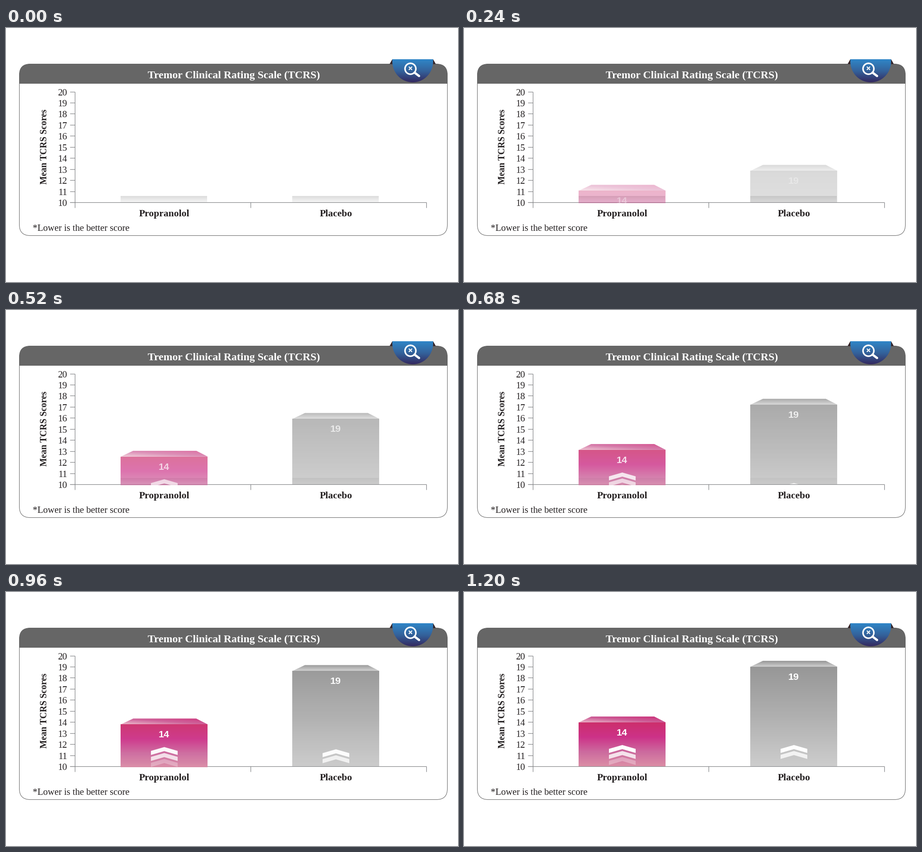
Recreate the animation shown at these times as a matplotlib script. Size 998x561 px, loop 8000 ms.

```python
import numpy as np
import matplotlib.pyplot as plt
from matplotlib.animation import FuncAnimation
from matplotlib.colors import to_rgb
from matplotlib.patches import FancyBboxPatch, Polygon, Rectangle, Circle
from matplotlib.path import Path
from matplotlib.transforms import Affine2D, Bbox, TransformedBbox

W, H = 998, 561
DPI = 100
STEP = 40           # ms per frame
LOOP = 8000
RISE = 1200         # ms the bars need to rise and fade in
PX = 72 / DPI       # points per pixel

INK = "#231f20"
AXIS = "#808285"
LEFT, RIGHT, TOP, BASE = 152, 928, 140.6, 385
BAR_W = 192

plt.rcParams["toolbar"] = "None"
fig = plt.figure(figsize=(W / DPI, H / DPI), dpi=DPI, facecolor="white")
ax = fig.add_axes([0, 0, 1, 1])
ax.set_xlim(0, W)
ax.set_ylim(H, 0)
ax.axis("off")


def ramp(k, colors):
    """Colours at positions k (0 to 1) along evenly spaced key colours."""
    keys = np.array([to_rgb(c) for c in colors])
    pos = np.linspace(0, 1, len(keys))
    return np.stack([np.interp(k, pos, keys[:, i]) for i in range(3)], axis=-1)


def vertical(*colors):
    return ramp(np.linspace(0, 1, 220), colors)[:, None, :]


def label(x, y, text, px, weight="normal", color=INK, family="Liberation Serif", **kw):
    kw.setdefault("ha", "center")
    return ax.text(x, y, text, fontsize=px * PX, fontweight=weight, color=color,
                   family=family, va="baseline", **kw)


def line(xs, ys, width=1.2, color=AXIS, z=1.0, cap="butt"):
    ax.plot(xs, ys, color=color, lw=width * PX, zorder=z, solid_capstyle=cap)


def gradient_shape(verts, pixels, z, trans=ax.transData):
    """Fill a polygon with an image that spans its bounding box."""
    verts = np.asarray(verts, float)
    (x0, y0), (x1, y1) = verts.min(axis=0), verts.max(axis=0)
    img = ax.imshow(pixels, extent=(x0, x1, y1, y0), aspect="auto",
                    interpolation="nearest", zorder=z, transform=trans)
    img.set_clip_path(Path(np.vstack([verts, verts[:1]])), trans)
    return img


def box(x0, y0, x1, y1):
    return [(x0, y0), (x1, y0), (x1, y1), (x0, y1)]


def draw_panel():
    def frame(**kw):
        return ax.add_patch(FancyBboxPatch(
            (29.5, 79.5), 945, 379, boxstyle="round,pad=0,rounding_size=24", **kw))

    panel = frame(fc="white", ec="none", zorder=0)
    header = ax.add_patch(Rectangle((29, 79), 947, 44, fc="#666666", ec="none", zorder=0.2))
    header.set_clip_path(panel)
    frame(fc="none", ec="#5f5f5f", lw=PX, zorder=0.3)
    label(503, 110.5, "Tremor Clinical Rating Scale (TCRS)", 23.7, "bold", "white")
    label(59, 447.5, "*Lower is the better score", 20.6, ha="left")


def draw_badge():
    mid, top, r = 898, 69, 45
    for side in (-1, 1):
        ax.add_patch(Polygon([(mid + side * r, top), (mid + side * (r + 6), top + 10.5),
                              (mid + side * (r - 1), top + 11)],
                             fc="#35262b", ec="none", zorder=0.5))
    a = np.linspace(0, np.pi, 60)
    bowl = np.column_stack([mid + r * np.cos(a), top + 5 + (r + 1) * np.sin(a)])
    verts = np.vstack([[(mid + r, top)], bowl, [(mid - r, top)]])
    gradient_shape(verts, vertical("#2f86c8", "#34639c", "#33285f"), 0.6)

    cx, cy = 893, 90
    ax.add_patch(Circle((cx, cy), 12, fc="none", ec="white", lw=3.4 * PX, zorder=0.7))
    line([cx + 9, cx + 19], [cy + 8.5, cy + 16], 5, "white", 0.7, "round")
    for d in (-3.5, 3.5):
        line([cx - 3.5, cx + 3.5], [cy - 1 - d, cy - 1 + d], 2.2, "white", 0.7)


def draw_axes():
    line([LEFT, LEFT], [TOP, BASE])
    line([LEFT - 11, RIGHT], [BASE, BASE])
    for x in np.linspace(LEFT, RIGHT, 3):
        line([x, x], [BASE, BASE + 12])
    for score, y in zip(range(10, 21), np.linspace(BASE, TOP, 11)):
        line([LEFT - 11, LEFT], [y, y])
        label(134.7, y + 8, str(score), 20.8, ha="right")
    label(90.5, 262.5, "Mean TCRS Scores", 19.9, "bold", rotation=90,
          rotation_mode="anchor")


class Bar:
    """A block that slides up from behind its floor while its parts fade in."""

    def __init__(self, name, value, x, top, travel, floor, front, face, chevrons):
        self.travel = travel
        self.move = Affine2D()
        trans = self.move + ax.transData
        clip = TransformedBbox(Bbox.from_extents(0, 1 - floor / H, 1, 1), ax.transAxes)
        x1, mid = x + BAR_W, x + BAR_W / 2

        label(mid, BASE + 31, name, 21.5, "bold")
        gradient_shape(box(x - 0.5, 371, x1 - 1.5, BASE), vertical("#dcdcdc", "#f6f6f6"), 0.8)

        lid = [(x + 27.5, top - 13), (x1 - 25.5, top - 13), (x1, top), (x, top)]
        self.parts = [
            (gradient_shape(lid, face, 3, trans), 1),
            (gradient_shape(box(x, top, x1, BASE), front, 3, trans), 1),
            (label(mid - 0.5, top + 29, value, 21.5, "bold", "white", "Liberation Sans",
                   transform=trans, zorder=5, clip_on=True), 1),
        ]
        for i, alpha in enumerate(chevrons):
            y = 338 + 13.2 * i
            wing = np.array([-29.5, 0, 29.5])
            edge = y + 8.5 * np.abs(wing) / 29.5
            verts = np.column_stack([np.r_[wing, wing[::-1]] + mid,
                                     np.r_[edge, edge + 9]])
            arrow = Polygon(verts, fc="white", ec="none", zorder=4, transform=trans)
            self.parts.append((ax.add_patch(arrow), alpha))
        for part, _ in self.parts:
            part.set_clip_box(clip)

    def update(self, rest):
        self.move.clear().translate(0, self.travel * rest)
        for part, alpha in self.parts:
            part.set_alpha(alpha * (1 - rest))


draw_panel()
draw_badge()
draw_axes()

# the lid of the pink bar is lit from its lower left corner
u, v = np.meshgrid(np.linspace(0, 1, BAR_W), np.linspace(0, 1, 28))
pink_lid = ramp((v - u + 1) / 2, ["#cc2e78", "#cc5c96", "#ebb6c8"])

bars = [
    Bar("Propranolol", "14", 253.5, 288, 111.5, 387,
        vertical("#cd2f6c", "#cc3288", "#cc6a9e", "#dc8ea6"), pink_lid, (1, 0.8, 0.3)),
    Bar("Placebo", "19", 632.5, 165, 235, 385,
        vertical("#979797", "#b0b0b0", "#cdcdcd"), vertical("#969696", "#d0d0d0"), (1, 0.78)),
]


def update(frame):
    rest = (1 - min(frame * STEP / RISE, 1)) ** 2
    for bar in bars:
        bar.update(rest)
    return []


anim = FuncAnimation(fig, update, frames=LOOP // STEP, interval=STEP,
                     init_func=lambda: update(0), repeat=True, repeat_delay=0)
plt.show()
```
